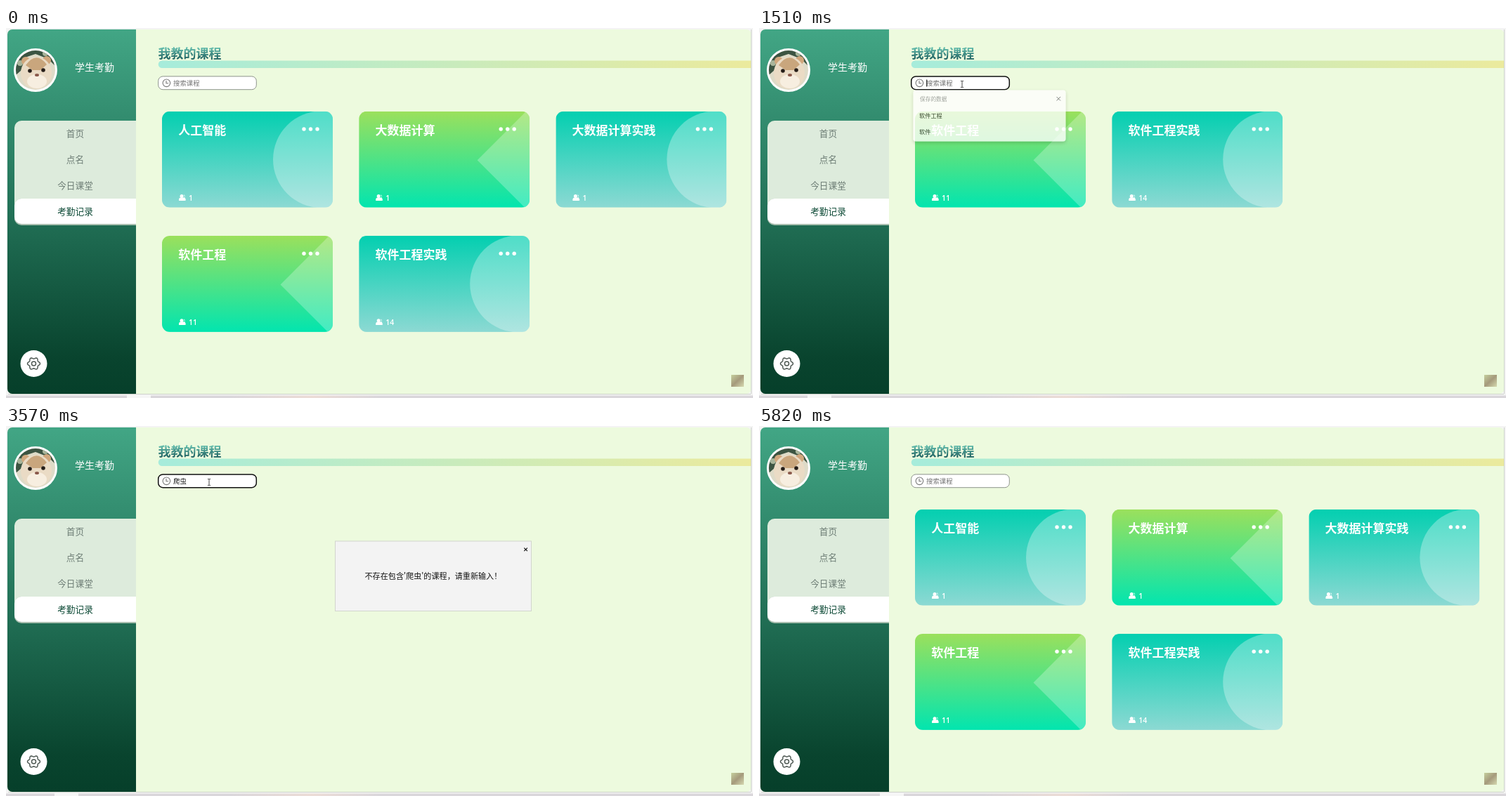
Animation of 1063 by 527 pixels, one loop 5880 ms. Source, as an HTML page:

```html
<!DOCTYPE html>
<html lang="zh-CN">
<head>
<meta charset="utf-8">
<style>
html, body { margin: 0; width: 100%; height: 100%; overflow: hidden; background: #f4f4f4; }
svg { display: block; width: 100vw; height: 100vh; }
text { font-family: "Noto Sans CJK SC", "Noto Sans CJK", sans-serif; white-space: pre; }
.num { font-family: "Open Sans", "Noto Sans", sans-serif; font-weight: 600; }
</style>
</head>
<body>
<svg id="stage" viewBox="0 0 1063 527" preserveAspectRatio="none">
  <defs>
    <linearGradient id="side" x2="0" y2="1"><stop stop-color="#42a685"/><stop offset=".5" stop-color="#227157"/><stop offset=".9" stop-color="#09442e"/><stop offset="1" stop-color="#063f2a"/></linearGradient>
    <linearGradient id="teal" x2="0" y2="1"><stop stop-color="#03cfb0"/><stop offset="1" stop-color="#8cd9d3"/></linearGradient>
    <linearGradient id="lime" x2="0" y2="1"><stop stop-color="#9be05c"/><stop offset="1" stop-color="#02e5af"/></linearGradient>
    <linearGradient id="rule"><stop stop-color="#a6ecdb"/><stop offset="1" stop-color="#ebea9d"/></linearGradient>
    <linearGradient id="ink" x2="0" y2="1"><stop offset=".2" stop-color="#6cc6b4"/><stop offset=".8" stop-color="#256a68"/></linearGradient>
    <linearGradient id="edge"><stop offset=".3" stop-color="#dad7db"/><stop offset=".41" stop-color="#ecdcd6"/><stop offset=".5" stop-color="#dad7db"/></linearGradient>
    <linearGradient id="thumb" x2="1" y2="1"><stop stop-color="#c5cf9d"/><stop offset=".5" stop-color="#a59a7c"/><stop offset="1" stop-color="#d6d9b0"/></linearGradient>
    <clipPath id="face"><circle cx="42" cy="60" r="28"/></clipPath>
    <clipPath id="cardClip"><rect width="243" height="137" rx="11"/></clipPath>
    <filter id="soft" x="-10%" y="-20%" width="120%" height="150%"><feDropShadow dx="0" dy="2" stdDeviation="2.5" flood-opacity=".22"/></filter>
  </defs>
  <rect x="2" y="2" width="1058.5" height="519" rx="7" fill="#edfade"/>
  <path d="M1060.5 2V521M3 521.5H1060" stroke="#cfd3cc" fill="none"/>
  <path d="M185 2H9a7 7 0 0 0-7 7V514a7 7 0 0 0 7 7H185z" fill="url(#side)"/>

  <circle cx="42" cy="60" r="31" fill="#fff"/>
  <g clip-path="url(#face)">
    <rect x="13" y="31" width="58" height="58" fill="#dedbc8"/>
    <path d="M13 31H71V55L60 44 42 37 27 42 22 60 13 68z" fill="#3c5442"/>
    <circle cx="20" cy="50" r="4" fill="#a9b59b"/><circle cx="56" cy="36" r="4" fill="#a9b59b"/>
    <circle cx="28" cy="47" r="6" fill="#d0a77d"/><circle cx="58" cy="46" r="6" fill="#d0a77d"/>
    <ellipse cx="43" cy="64" rx="22" ry="23" fill="#eadbc5"/>
    <path d="M28 53Q43 32 58 52L49 60H38z" fill="#c9a67d"/>
    <ellipse cx="44" cy="76" rx="14" ry="10" fill="#f7eee0"/>
    <circle cx="34" cy="61" r="2.8" fill="#251d18"/><circle cx="53" cy="60" r="2.8" fill="#251d18"/>
    <ellipse cx="44" cy="67" rx="3" ry="2" fill="#8b5a4c"/>
  </g>
  <text x="98" y="60.5" font-size="14" fill="#fff">学生考勤</text>

  <path d="M185 132H22a10 10 0 0 0-10 10V270a10 10 0 0 0 10 10H185z" fill="#ddebdc"/>
  <path d="M185 243H22a10 10 0 0 0-10 10V271a10 10 0 0 0 10 10H185z" fill="#a9bfb0"/>
  <path d="M185 243H22a10 10 0 0 0-10 10V269a10 10 0 0 0 10 10H185z" fill="#fff"/>
  <g id="menu" font-size="12.7" text-anchor="middle"></g>

  <circle cx="39.5" cy="478" r="19" fill="#fff"/>
  <g fill="none" stroke="#505a55" stroke-width="1.5" stroke-linejoin="round"><path id="gear"/><circle cx="39.5" cy="478" r="3"/></g>

  <text x="216.5" y="42.5" font-size="18" font-weight="900" fill="url(#ink)">我教的课程</text>
  <path d="M1060 46.5H222a5 5 0 0 0 0 10.5H1060z" fill="url(#rule)"/>
  <rect x="1032" y="494" width="18" height="17" fill="url(#thumb)"/>
  <g id="live"></g>
</svg>
<script>
const LOOP = 5880;
const $ = id => document.getElementById(id);
const label = (x, y, size, fill, str, extra = '') =>
  `<text x="${x}" y="${y}" font-size="${size}" fill="${fill}" ${extra}>${str}</text>`;

$('menu').innerHTML = ['首页', '点名', '今日课堂', '考勤记录'].map((name, i) =>
  label(98.5, 154.5 + 37 * i, 12.7, i === 3 ? '#0d4a36' : '#6d7d75', name, i === 3 ? 'font-weight="500"' : '')).join('');

$('gear').setAttribute('d', 'M' + Array.from({ length: 48 }, (_, i) => {
  const a = i * Math.PI / 24, r = 7.9 + 1.1 * Math.cos(6 * a);
  return `${(39.5 + r * Math.cos(a)).toFixed(2)} ${(478 + r * Math.sin(a)).toFixed(2)}`;
}).join('L') + 'z');

const AI = ['人工智能', 1], DATA = ['大数据计算', 1], DATA_LAB = ['大数据计算实践', 1];
const SOFT = ['软件工程', 11], SOFT_LAB = ['软件工程实践', 14];
const ALL = [AI, DATA, DATA_LAB, SOFT, SOFT_LAB];
const SOFT_LIST = [SOFT, SOFT_LAB], DATA_LIST = [DATA, DATA_LAB];
const blank = { text: '', focus: 0, caret: 0, ime: null, drop: 0, cards: ALL, dialog: 0, status: 0, icons: 1, gap: 172 };

const typing = (text, width, words) => ({ text, caret: 1, ime: { width, words } });
const done = (text, caret = 1) => ({ text, caret, ime: null });
const softWords = ['软件', '软', '软件工程', '阮'];
const dataWords = ['大数据', '大树', '打数', '大叔', '大'];
const calcWords = ['大数据计算', '大数据', '大树', '打数', '大叔', '大'];
const bugWords = ['爬虫', '怕', '爬', '趴'];

// Each entry changes part of the state from its time on.
const steps = [
  [70, { gap: 69 }],
  [580, { focus: 1, caret: 1 }],
  [720, typing('r', 230, softWords)],
  [790, typing("ruan'j", 250, softWords)],
  [860, typing("ruan'jian", 250, softWords)],
  [930, typing("ruan'jian'gong", 300, softWords)],
  [1000, typing("ruan'jian'gong'ch", 300, softWords)],
  [1100, done('软件工程')],
  [1170, { caret: 0 }],
  [1230, { cards: SOFT_LIST }],
  [1310, done('软件工')],
  [1370, done('软件')],
  [1440, { text: '', drop: .4 }],
  [1510, { drop: .78 }],
  [1580, { drop: 1 }],
  [1650, { drop: .4 }],
  [1710, { ...typing('d', 366, dataWords), drop: 0 }],
  [1830, typing("da's", 366, dataWords)],
  [1910, typing("da'shu", 366, dataWords)],
  [2050, typing("da'shu'j", 420, dataWords)],
  [2180, typing("da'shu'ju", 420, dataWords)],
  [2310, typing("da'shu'ju'ji", 479, calcWords)],
  [2450, typing("da'shu'ju'ji's", 479, calcWords)],
  [2530, typing("da'shu'ju'ji'suan", 479, calcWords)],
  [2670, done('大数据计算')],
  [2870, { cards: DATA_LIST }],
  [2940, done('大数据')],
  [3020, done('大')],
  [3090, done('')],
  [3150, typing('p', 230, bugWords)],
  [3220, typing("pa'ch", 230, bugWords)],
  [3290, typing("pa'chong", 230, bugWords)],
  [3360, done('爬虫')],
  [3500, { cards: [], caret: 0 }],
  [3570, { dialog: 1 }],
  [4460, { status: 1 }],
  [4580, { text: '', focus: 0, dialog: 0, cards: ALL, icons: 0 }],
  [4800, { icons: 1 }],
  [4900, { status: 0 }],
  [5740, { gap: 172 }]
];

// Pointer stops: time, x, y.
const stops = [
  [0, 682, 516], [70, 682, 516], [580, 289, 80], [4800, 289, 80],
  [5010, 501, 92], [5610, 966, 475], [5740, 945, 518]
];

function pointer(t) {
  if (t < 70 || t >= 5820) return '';
  const held = 70 + Math.floor((t - 70) / 67) * 67;
  let i = stops.findIndex(s => s[0] > held);
  if (i < 0) i = stops.length - 1;
  const [t0, x0, y0] = stops[i - 1], [t1, x1, y1] = stops[i];
  const p = Math.min(1, (held - t0) / (t1 - t0)), e = p * p * (3 - 2 * p);
  const x = x0 + (x1 - x0) * e, y = y0 + (y1 - y0) * e;
  const beam = x > 217 && x < 356 && y > 68 && y < 89;
  return `<g transform="translate(${x.toFixed(1)} ${y.toFixed(1)})">` + (beam
    ? '<path d="M-2-4.5H-.5L0-4 .5-4.5H2M0-4V4M-2 4.5H-.5L0 4 .5 4.5H2" fill="none" stroke="#333" stroke-width=".9"/>'
    : '<path d="M0 0V10.2L2.4 8 4 11.4 5.6 10.7 4.1 7.4H7.3z" fill="#fff" stroke="#222" stroke-width=".7"/>') + '</g>';
}

function card([title, count], i, icons) {
  const lime = /算$|工程$/.test(title);
  const person = '<path d="M24 127.2v-1.5q0-3 3-3h3.5q3 0 3 3v1.5z"/><circle cx="28" cy="120.8" r="2.5"/><path d="M31 118.6a2.2 2.2 0 0 1 0 4.2q3 .6 3 4.4"/>';
  return `<g transform="translate(${222 + i % 3 * 280.2} ${118.7 + Math.floor(i / 3) * 177.2})" fill="#fff">
    <g clip-path="url(#cardClip)"><rect width="243" height="137" fill="url(#${lime ? 'lime' : 'teal'})"/>
    ${lime ? '<path d="M168.500 69.500L243-5V144z" fill-opacity=".25"/>' : '<circle cx="227" cy="68.500" r="69" fill-opacity=".3"/>'}</g>
    ${label(23.2, 33.2, 17, '#fff', title, 'font-weight="700"')}
    ${[202, 211.5, 221].map(x => `<circle cx="${x}" cy="25.300" r="2.700"/>`).join('')}
    ${icons ? person : ''}${label(38, 127.3, 10.5, '#fff', count, 'class="num"')}</g>`;
}

function search({ text, focus, caret, ime }) {
  const end = 238.3 + (ime ? text.length * 4.7 : text.length * 9.4);
  return `<rect x="216.700" y="68.900" width="139.600" height="18.800" rx="6.500" fill="#fff" stroke="${focus ? '#111' : '#8d938b'}" stroke-width="${focus ? 1.5 : 1}"/>
    <g fill="none" stroke="#777" stroke-width="1.100"><circle cx="228.400" cy="78.300" r="5.300"/><path d="M228 75v3.700h3.200"/></g>
    ${label(238, 81.8, 9.4, text ? '#111' : '#757575', text || '搜索课程')}
    ${ime ? `<path d="M238 84.500H${end}" stroke="#555" stroke-width=".6" stroke-dasharray="1.500 1"/>` : ''}
    ${focus && caret ? `<path d="M${end + .4} 73.500V83.500" stroke="#111"/>` : ''}`;
}

function candidates({ width, words }) {
  const gap = (width - 20) / words.length;
  return `<rect x="238.500" y="90.500" width="${width - 1}" height="22.500" rx="3" fill="#f9f9f9" stroke="#cfcfcf"/>` +
    words.map((w, i) => label(246 + gap * i, 105.5, 10.5, i ? '#333' : '#1767b0', `${i + 1} ${w}`)).join('');
}

const dropdown = alpha => `<g opacity="${alpha}"><rect x="219.500" y="88.500" width="217" height="73" rx="4" fill="#fff" filter="url(#soft)"/>
  ${label(229, 103.6, 7.7, '#8a8a8a', '保存的数据')}
  <path d="M423.500 98l5.500 5.500m0-5.500l-5.500 5.500" stroke="#555" stroke-width=".9"/>
  ${label(228, 127.8, 8.2, '#222', '软件工程')}${label(228, 150.6, 8.2, '#222', '软件')}</g>`;

const dialog = `<rect x="468.500" y="164" width="279" height="99.500" fill="#f3f3f3" stroke="#d2d5cd"/>
  ${label(510.5, 218.3, 11.1, '#111', "不存在包含'爬虫'的课程，请重新输入！")}
  <path d="M737.300 173.600l4.600 4.600m0-4.600l-4.600 4.600" stroke="#111" stroke-width="1.200"/>`;

const status = `<path d="M2 506H350a3 3 0 0 1 3 3V521H2z" fill="#cdcdcd"/>` +
  label(5, 516.6, 8.4, '#222', '正在等待 47.120.48.211...');

let shown = '';
function draw(now) {
  const t = now % LOOP, s = { ...blank };
  for (const [at, change] of steps) if (at <= t) Object.assign(s, change);
  const html = search(s) + s.cards.map((c, i) => card(c, i, s.icons)).join('') +
    (s.drop ? dropdown(s.drop) : '') + (s.ime ? candidates(s.ime) : '') +
    (s.dialog ? dialog : '') + (s.status ? status : '') +
    `<rect y="523.500" width="1063" height="3.500" fill="url(#edge)"/><rect x="${s.gap}" y="523" width="34" height="4" fill="#f6f6f6"/>` +
    pointer(t);
  if (html !== shown) $('live').innerHTML = shown = html;
}

const start = performance.now();
function tick() {
  draw(performance.now() - start);
  requestAnimationFrame(tick);
}
tick();
</script>
</body>
</html>
```
